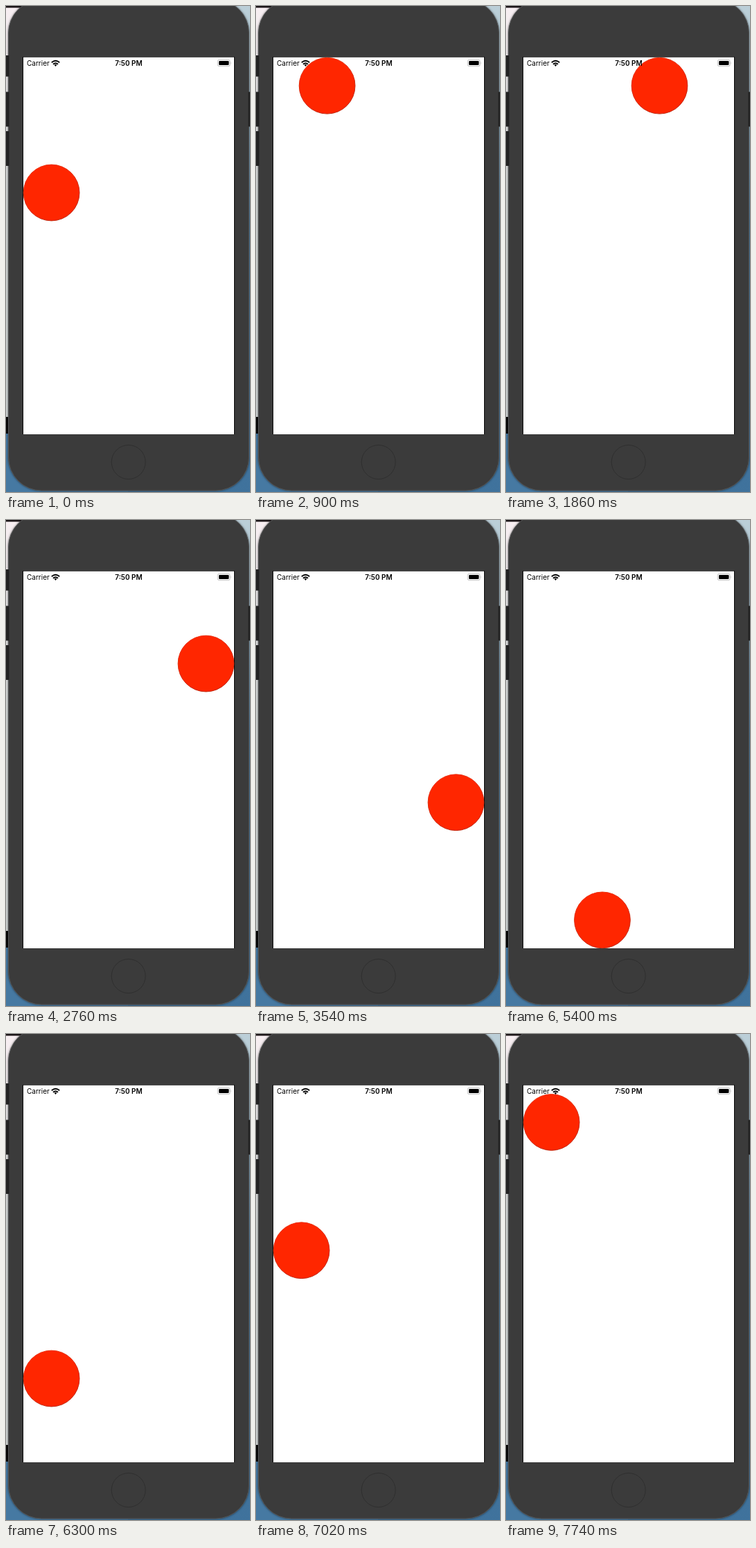
An HTML page that plays this animation: 352 px wide and 699 px high, repeating every 7800 ms.

```html
<!DOCTYPE html>
<html lang="en">
<head>
<meta charset="utf-8">
<title>Ball around the screen edge</title>
<style>
  html, body { margin: 0; width: 100%; height: 100%; overflow: hidden; }
  svg { display: block; width: 352px; height: 699px; }
  text { font: 10px Inter, Roboto, sans-serif; }
  .clock { font-weight: 600; text-anchor: middle; }
  .body { filter: drop-shadow(0 0 1.5px #0008); }
</style>
</head>
<body>
<svg viewBox="0 0 352 699">
  <defs>
    <linearGradient id="left" x2="0" y2="1">
      <stop offset="0" stop-color="#f8eff2"/>
      <stop offset=".15" stop-color="#e6e4e5"/>
      <stop offset=".4" stop-color="#d2d6d5"/>
      <stop offset="1" stop-color="#cdd2d2"/>
    </linearGradient>
    <linearGradient id="right" x2="0" y2="1">
      <stop offset="0" stop-color="#bccfd8"/>
      <stop offset=".2" stop-color="#9dbccd"/>
      <stop offset=".45" stop-color="#4c80a8"/>
      <stop offset="1" stop-color="#3f729c"/>
    </linearGradient>
    <linearGradient id="rim" x2=".4" y2="1">
      <stop offset="0" stop-color="#f42800"/>
      <stop offset="1" stop-color="#b81a00"/>
    </linearGradient>
  </defs>

  <!-- desktop -->
  <rect width="176" height="699" fill="url(#left)"/>
  <rect x="176" width="176" height="699" fill="url(#right)"/>
  <rect width="24" height="2.5" fill="#1c1618"/>
  <rect y="591" width="10" height="24" fill="#080808"/>
  <rect y="615" width="176" height="84" fill="#4679a2"/>

  <!-- phone -->
  <rect class="body" x="3.5" y="-9" width="347" height="706" rx="48" fill="#3b3b3b" stroke="#555758"/>
  <g fill="#222">
    <rect x="-3" y="71" width="7.5" height="30.5" rx="1"/>
    <rect x="-3" y="123.5" width="7.5" height="50" rx="1"/>
    <rect x="-3" y="180" width="7.5" height="50" rx="1"/>
    <rect x="349.5" y="123.5" width="6" height="50" rx="1"/>
  </g>
  <circle cx="176.7" cy="656" r="24.5" fill="none" stroke="#2f2f2f"/>
  <rect x="24" y="73" width="306" height="543" fill="#050505"/>
  <rect x="25" y="73.7" width="304" height="542.3" fill="#fff"/>

  <circle id="ball" r="40.4" fill="#ff2600" stroke="url(#rim)" stroke-width=".9"/>

  <!-- status bar -->
  <text x="30" y="86">Carrier</text>
  <g fill="none" stroke="#000" stroke-width="1.9">
    <path d="M65.8 81.2Q71.5 76.2 77.2 81.2M68 83.7Q71.5 80.7 75 83.7"/>
    <path d="M69.6 84.8Q71.5 83.4 73.4 84.8L71.5 86.9Z" fill="#000" stroke="none"/>
  </g>
  <text class="clock" x="177" y="86">7:50 PM</text>
  <rect x="305.3" y="77.3" width="17.8" height="9.4" rx="2.4" fill="none" stroke="#b0b0b0" stroke-width=".8"/>
  <rect x="307" y="79" width="14.5" height="6" rx="1.2"/>
  <path d="M324 80.5q1.4 1.5 0 3z" fill="#b0b0b0"/>
</svg>
<script>
  const LOOP = 7800, STEP = 60;
  const L = 65.6, R = 288.5, T = 114.7, B = 575.4;
  // corner arrivals: time, x, y
  const path = [
    [-1199, L, B], [601, L, T], [2401, R, T],
    [4201, R, B], [5988, L, B], [7788, L, T]
  ];
  const ball = document.getElementById('ball');

  function draw(now) {
    const t = Math.floor(now % LOOP / STEP) * STEP;
    const i = path.findIndex(p => p[0] > t);
    const [t0, x0, y0] = path[i - 1], [t1, x1, y1] = path[i];
    const k = (t - t0) / (t1 - t0);
    ball.setAttribute('cx', x0 + (x1 - x0) * k);
    ball.setAttribute('cy', y0 + (y1 - y0) * k);
  }

  function tick() {
    draw(performance.now());
    requestAnimationFrame(tick);
  }
  tick();
</script>
</body>
</html>
```
